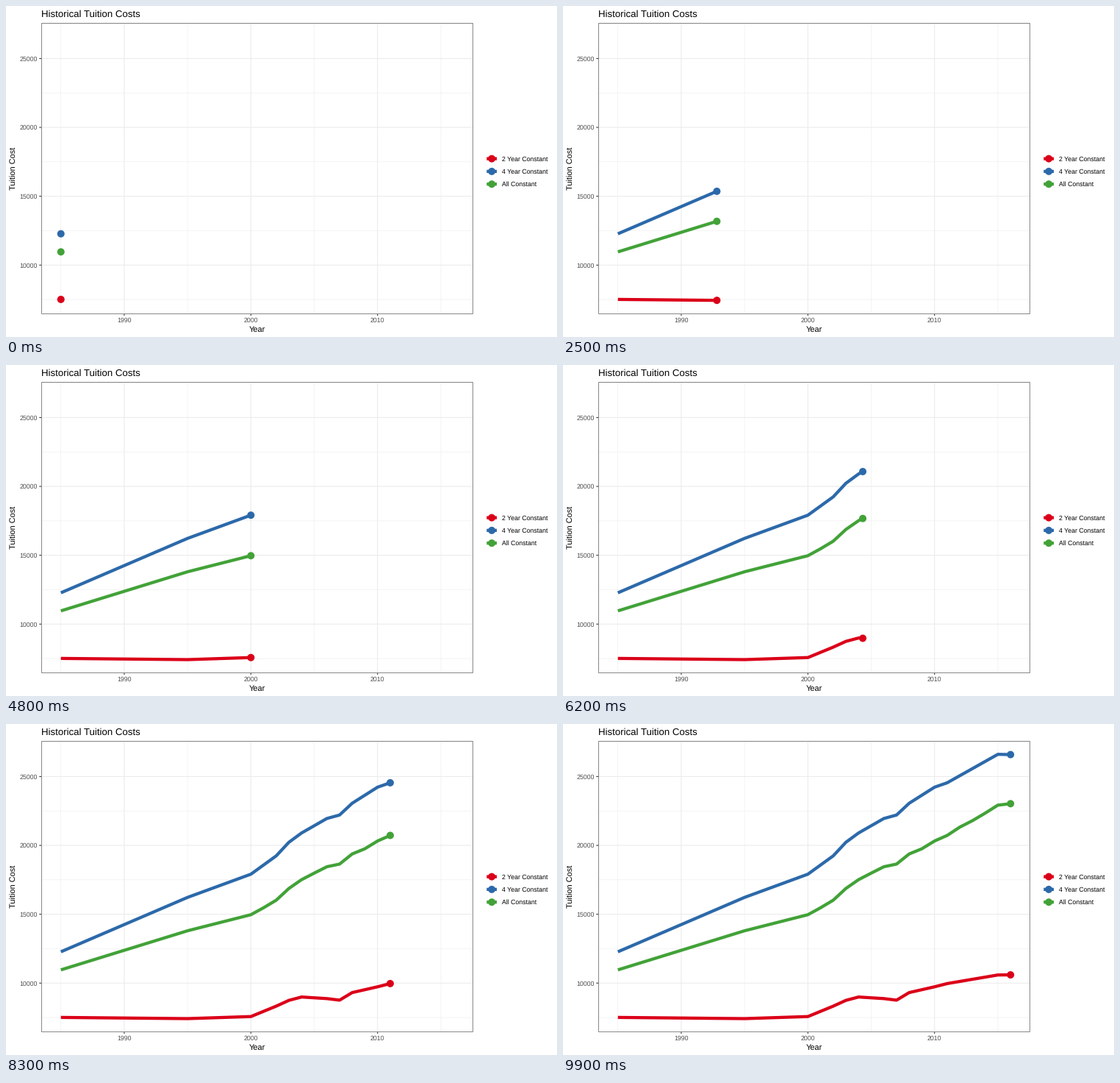
A matplotlib script for the animation above (10 s loop, 750x450 px).

```python
import numpy as np
import matplotlib.pyplot as plt
from matplotlib.animation import FuncAnimation
from matplotlib.patches import Circle, Rectangle

W, H, DPI = 750, 450, 100
PT = 72 / DPI  # points per pixel
FRAMES, INTERVAL = 100, 100

LEFT, RIGHT, TOP, BOTTOM = 48.0, 635.9, 23.25, 418.5
X_RANGE = (1983.45, 2017.55)
Y_RANGE = (6461.4, 27572.6)

# Turning points: year, two-year cost, four-year cost
turns = np.array([
    (1985, 7508, 12274), (1995, 7421, 16224), (2000, 7571, 17909),
    (2002, 8326, 19239), (2003, 8746, 20225), (2004, 8990, 20900),
    (2006, 8875, 21953), (2007, 8761, 22205), (2008, 9313, 23062),
    (2010, 9731, 24226), (2011, 9966, 24547), (2015, 10590, 26613),
    (2016, 10598, 26593),
]).T
years = np.array([1985, 1995, *range(2000, 2017)])
two_year, four_year = (np.interp(years, turns[0], row) for row in turns[1:])

# The overall cost blends both: the four-year share swings, then steps up
share = (0.72 - 0.015 * np.cos(2 * np.pi * (years - 2002) / 10)
         + 0.045 * np.clip((years - 2009) / 3, 0, 1))
overall = two_year + share * (four_year - two_year)

series = [
    ("2 Year Constant", "#DB0019", two_year),
    ("4 Year Constant", "#2C69AA", four_year),
    ("All Constant", "#42A238", overall),
]

# Each year is reached on a whole frame; motion is linear in between
key_frames = np.round((years - years[0]) / (years[-1] - years[0]) * (FRAMES - 1))


def px(year):
    return np.interp(year, X_RANGE, (LEFT, RIGHT))


def py(cost):
    return np.interp(cost, Y_RANGE, (BOTTOM, TOP))


plt.rcParams.update({
    "font.family": "Liberation Sans",
    "text.hinting": "none",
    "path.simplify": False,
})
fig = plt.figure(figsize=(W / DPI, H / DPI), dpi=DPI, facecolor="white")
ax = fig.add_axes([0, 0, 1, 1])
ax.set(xlim=(0, W), ylim=(H, 0))
ax.axis("off")


def stroke(xs, ys, color, width, z):
    line, = ax.plot(xs, ys, color=color, lw=width * PT, zorder=z, snap=False,
                    solid_capstyle="butt", solid_joinstyle="round")
    return line


def dot(x, y, color):
    return ax.add_patch(Circle((x, y), 5, fc=color, lw=0, zorder=5, snap=False))


def label(x, y, text, size, color="black", ha="center", rotation=0):
    ax.text(x, y, text, fontsize=size * PT, color=color, ha=ha, va="baseline",
            rotation=rotation, rotation_mode="anchor")


def grid(xs, ys, width, z):
    for x in xs:
        stroke([px(x)] * 2, [TOP, BOTTOM], "#EBEBEB", width, z)
    for y in ys:
        stroke([LEFT, RIGHT], [py(y)] * 2, "#EBEBEB", width, z)


x_breaks = range(1990, 2011, 10)
y_breaks = range(10000, 25001, 5000)
grid(range(1985, 2016, 10), range(7500, 27501, 5000), 0.53, 1)
grid(x_breaks, y_breaks, 1.07, 2)

for x in x_breaks:
    stroke([px(x)] * 2, [BOTTOM, BOTTOM + 2.74], "#333333", 1.07, 3)
    label(px(x), 430, str(x), 8.8, "#4D4D4D")
for y in y_breaks:
    stroke([LEFT - 2.74, LEFT], [py(y)] * 2, "#333333", 1.07, 3)
    label(43, py(y) + 3.2, str(y), 8.8, "#4D4D4D", "right")

ax.add_patch(Rectangle((48.5, 23.5), 587, 395, fill=False, ec="#888888",
                       lw=PT, zorder=6, joinstyle="miter", snap=False))

label(48, 15, "Historical Tuition Costs", 13.2, ha="left")
label((LEFT + RIGHT) / 2, 443, "Year", 11)
label(14, (TOP + BOTTOM) / 2, "Tuition Cost", 11, rotation=90)

trails = []
for i, (name, color, costs) in enumerate(series):
    y = 207.6 + 17.28 * i
    stroke([654.3, 668.1], [y, y], color, 4.27, 4)
    dot(661.2, y, color)
    label(675, y + 3.2, name, 8.8, ha="left")
    trails.append((stroke([], [], color, 4.27, 4),
                   dot(px(years[0]), py(costs[0]), color), costs))


def update(frame):
    done = key_frames < frame
    head_year = np.interp(frame, key_frames, years)
    artists = []
    for line, head, costs in trails:
        head_cost = np.interp(frame, key_frames, costs)
        xs = px(np.append(years[done], head_year))
        ys = py(np.append(costs[done], head_cost))
        line.set_data(xs, ys)
        head.center = xs[-1], ys[-1]
        artists += [line, head]
    return artists


anim = FuncAnimation(fig, update, frames=FRAMES, interval=INTERVAL,
                     repeat=True, repeat_delay=0)
plt.show()
```
